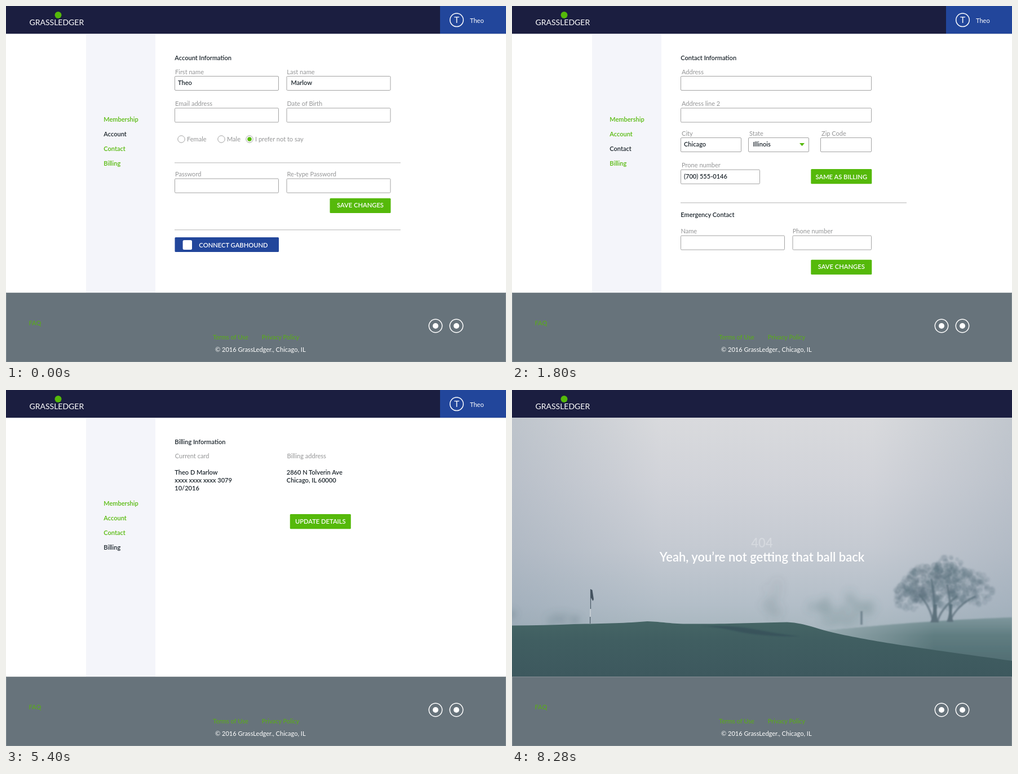
An HTML page for the animation above (9000 ms loop, 887x631 px).

```html
<!DOCTYPE html>
<html lang="en">
<head>
<meta charset="utf-8">
<title>Account pages</title>
<style>
  html, body { margin: 0; width: 100%; height: 100%; overflow: hidden; background: #fff; }
  svg { display: block; width: 100vw; height: 100vh; }
  text { font: 400 11.05px Lato, "Open Sans", sans-serif; fill: #949596; white-space: pre; }
  .bold { font-weight: 600; fill: #1c252c; }
  .link { font-weight: 600; fill: #55b90a; }
  .button { font-weight: 600; font-size: 11.2px; fill: #fff; text-anchor: middle; }
  .foot { fill: #59b013; }
  .white { fill: #fff; }
  .box { fill: #fff; stroke: #a3a3a3; }
  .rule { stroke: #b4b4b4; }
  .ring { fill: none; stroke: #fff; stroke-width: 1.5; }
  .headline { font-size: 22px; font-weight: 600; fill: #fff; text-anchor: middle; }
</style>
</head>
<body>
<svg id="stage" viewBox="0 0 887 631" preserveAspectRatio="none" xmlns="http://www.w3.org/2000/svg"></svg>
<script>
const PAGE_MS = 1800;
const GREEN = '#55b90a', NAVY = '#1b1e40', BLUE = '#22469b';
const PHONE = '(700) 555-0146';

// Text is placed by its left edge and the middle of its capitals.
const text = (x, y, str, cls = '') => `<text x="${x}" y="${y + 4}" class="${cls}">${str}</text>`;
const bold = (x, y, str) => text(x, y, str, 'bold');
const rect = (x, y, w, h, fill, rx = 0) =>
  `<rect x="${x}" y="${y}" width="${w}" height="${h}" rx="${rx}" fill="${fill}"/>`;
const circle = (x, y, r, attrs) => `<circle cx="${x}" cy="${y}" r="${r}" ${attrs}/>`;
const rule = y => `<path class="rule" d="M299 ${y}H700"/>`;
const caret = (x, y) => `<path d="M${x - 4.5} ${y - 2.5}h9l-4.5 5.2z" fill="${GREEN}"/>`;

const box = (x, y, w) =>
  `<rect class="box" x="${x + .5}" y="${y + .5}" width="${w - 1}" height="25" rx="1.5"/>`;
const field = (x, y, w, label, value = '', labelX = x + 1, valueX = x + 6) =>
  text(labelX, y - 7.5, label) + box(x, y, w) + (value && bold(valueX, y + 12, value));
const button = (x, y, label, textY = y + 12.5) =>
  rect(x, y, 108, 26.3, GREEN, 1.5) + text(x + 54, textY, label, 'button');
const radio = (x, label, on) =>
  circle(x, 236, 6.2, 'fill="#fff" stroke="#a3a3a3"') +
  (on ? circle(x, 236, 3.8, `fill="${GREEN}"`) : '') + text(x + 10, 236.3, label);

const addressRow = y =>
  field(299, y, 108, 'City', 'Chicago', 301) +
  field(419, y, 108, 'State', 'Illinois', 421, 427.5) + caret(514.5, y + 12.6) +
  field(547, y, 91, 'Zip Code', '', 549) +
  field(299, y + 56.7, 141, 'Prone number', PHONE, 301);

const nav = active => rect(142, 50, 123, 459, '#f4f5fa') +
  ['Membership', 'Account', 'Contact', 'Billing'].map((name, i) =>
    text(173.3, 200.5 + 26 * i, name, name === active ? 'bold' : 'link')).join('');

const user = rect(770, 0, 117, 49, BLUE) + circle(799.5, 24.8, 11.8, 'class="ring"') +
  '<text x="799.5" y="30.2" class="white" style="font-size:15.5px" text-anchor="middle">T</text>' +
  text(823, 25.5, 'Theo', 'white');

const header = rect(0, 0, 887, 49.2, NAVY) + circle(92.5, 16, 6, `fill="${GREEN}"`) +
  '<text x="41.5" y="34" class="white" style="font-size:14px">GRASSLEDGER</text>';

const badge = x => circle(x, 567, 11.7, 'class="ring"') + circle(x, 567, 5, 'fill="#fff"');
const footer = '<rect x=".5" y="508.5" width="886" height="122.5" fill="#67737b" stroke="#858e94"/>' +
  text(40.5, 562.3, 'FAQ', 'foot') + text(367, 587, 'Terms of Use', 'foot') +
  text(453.7, 587, 'Privacy Policy', 'foot') +
  text(371, 608.5, '© 2016 GrassLedger., Chicago, IL', 'white') + badge(762) + badge(799);

const account = nav('Account') + user + bold(299.3, 92, 'Account Information') +
  field(299, 124, 185, 'First name', 'Theo') +
  field(497.5, 124, 185, 'Last name', 'Marlow', 498.3, 505.5) +
  field(299, 180.5, 185, 'Email address') + field(497.5, 180.5, 185, 'Date of Birth') +
  radio(311, 'Female') + radio(382, 'Male') + radio(432, 'I prefer not to say', true) +
  rule(277.9) +
  field(299, 305.6, 185, 'Password') + field(497.5, 305.6, 185, 'Re-type Password') +
  button(574.5, 340.8, 'SAVE CHANGES') + rule(396.8) +
  rect(299.5, 410, 184.5, 26, BLUE, 1.5) + rect(313.6, 415, 16.4, 17, '#fff', 2.5) +
  text(403.5, 423.5, 'CONNECT GABHOUND', 'button');

const contact = nav('Contact') + user + bold(299.3, 92, 'Contact Information') +
  field(299, 124, 339, 'Address', '', 301) + field(299, 180.5, 339, 'Address line 2', '', 301) +
  addressRow(233) + button(530.3, 289, 'SAME AS BILLING', 302.5) + rule(348.8) +
  bold(299.3, 370, 'Emergency Contact') +
  field(299, 406.6, 185, 'Name', '', 299.5) +
  field(497.5, 406.6, 140.5, 'Phone number', '', 497.7) +
  button(530.3, 449.8, 'SAVE CHANGES');

const billing = nav('Billing') + user + bold(299.3, 91.5, 'Billing Information') +
  field(299, 124, 339, 'Name on card', 'Theo', 300.5, 308) +
  field(299, 180.5, 200, 'Card number', '', 299.5) + field(517, 180.5, 62, 'CVC', '', 517.5) +
  field(299, 237.3, 64.5, 'Expiration date', '', 299.5) + box(374, 237.3, 64.5) +
  text(305, 249.8, 'Month') + caret(350.5, 250.5) +
  text(386, 249.8, 'Year') + caret(425.5, 250.5) +
  field(299, 294, 339, 'Address', '', 301) + field(299, 350.6, 339, 'Address line 2', '', 301) +
  addressRow(403) + button(530.3, 459, 'SAVE CHANGES');

const summary = nav('Billing') + user + bold(299.3, 91.5, 'Billing Information') +
  text(299.7, 116.8, 'Current card') + text(498.5, 116.8, 'Billing address') +
  ['Theo D Marlow', 'xxxx xxxx xxxx 3079', '10/2016'].map((s, i) => bold(299.3, 146.3 + 13.6 * i, s)).join('') +
  ['2860 N Tolverin Ave', 'Chicago, IL 60000'].map((s, i) => bold(497.8, 146.3 + 13.6 * i, s)).join('') +
  button(503.8, 220, 'UPDATE DETAILS');

let seed = 11;
const random = () => (seed = seed * 16807 % 2147483647) / 2147483647;

// A cloud of leaf clumps inside an ellipse.
const foliage = (x, y, rx, ry, count, size, opacity) => Array.from({ length: count }, () => {
  const angle = random() * 2 * Math.PI, d = Math.sqrt(random());
  return circle((x + rx * d * Math.cos(angle)).toFixed(1), (y + ry * d * Math.sin(angle)).toFixed(1),
    (size * (.5 + random())).toFixed(1), `fill="#5b707d" opacity="${opacity}"`);
}).join('');

const gradient = (id, attrs, stops) => `<linearGradient id="${id}" ${attrs}>` +
  stops.map(([at, color, alpha = 1]) =>
    `<stop offset="${at}" stop-color="${color}" stop-opacity="${alpha}"/>`).join('') + '</linearGradient>';
const blur = (id, amount) =>
  `<filter id="${id}" x="-20%" y="-20%" width="140%" height="140%"><feGaussianBlur stdDeviation="${amount}"/></filter>`;
const DOWN = 'x1="0" y1="0" x2="0" y2="1"';

const defs = '<defs>' +
  gradient('sky', DOWN, [[0, '#d9dadd'], [.25, '#d1d3d9'], [.5, '#c5cad2'], [.72, '#b3bec8'], [.84, '#a6b5bd'], [1, '#9cadb4']]) +
  gradient('sides', '', [[0, '#8495a6', .32], [.3, '#8495a6', 0], [.72, '#8495a6', 0], [1, '#8495a6', .28]]) +
  gradient('field', DOWN, [[0, '#7f979d'], [.3, '#607d81'], [1, '#48656b']]) +
  gradient('haze', '', [[0, '#a4b4ba', .85], [.6, '#a4b4ba', 0]]) +
  gradient('hill', DOWN, [[0, '#456565'], [.35, '#405e61'], [1, '#3d585e']]) +
  blur('soft', 1.2) + blur('fog', 6) +
  '<clipPath id="photo"><rect y="49" width="887" height="460"/></clipPath></defs>';

const farField = 'M540 428C630 420 720 409 887 403V510H540Z';
const photo = '<g clip-path="url(#photo)">' +
  rect(0, 49, 887, 460, 'url(#sky)') + rect(0, 49, 887, 460, 'url(#sides)') +
  '<g filter="url(#fog)">' + foliage(582, 388, 58, 28, 50, 9, .06) +
  foliage(463, 375, 14, 38, 16, 9, .035) + foliage(85, 407, 35, 10, 20, 6, .09) +
  foliage(0, 395, 6, 12, 8, 5, .12) + '</g>' +
  `<g filter="url(#soft)"><path d="${farField}" fill="url(#field)"/><path d="${farField}" fill="url(#haze)"/>` +
  '<path d="M747 412Q743 385 722 362M748 411Q752 380 744 335M755 412Q758 390 790 365M777 411Q780 385 772 345' +
  'M776 411Q790 380 822 366M620 416V392" fill="none" stroke="#647782" stroke-width="3.5" opacity=".8"/>' +
  '<path d="M742 412Q748 400 747 380H754Q752 402 757 412ZM771 411Q777 398 775 380H781Q779 400 783 411Z" fill="#5d717c"/>' +
  foliage(763, 347, 72, 38, 230, 5.5, .17) + foliage(740, 342, 42, 34, 90, 5, .16) +
  foliage(778, 322, 28, 28, 70, 4.5, .17) + foliage(818, 352, 36, 30, 70, 4.5, .15) +
  foliage(706, 365, 32, 25, 70, 4.5, .15) + '</g>' +
  '<path d="M0 417.5Q60 417 110 415C165 414 205 413 240 410C270 411 275 414 310 414.5C370 415 420 413 488 411.5' +
  'C520 413 535 422 570 430C640 446 720 457 887 480V510H0Z" fill="url(#hill)"/>' +
  '<path d="M335 419Q390 416 430 424T510 437Q440 437 400 428T335 419Z" fill="#344e58" opacity=".65" filter="url(#soft)"/>' +
  '<path d="M139.5 353V388M138.6 402V414" stroke="#4a5966" stroke-width="1.2"/>' +
  '<path d="M139 388V402" stroke="#d6dade" stroke-width="1.2"/>' +
  '<path d="M139 353L142.5 354.5L145 371L143.5 374L140 368Z" fill="#44525f"/></g>';

const lost = photo +
  '<text x="443.5" y="278.5" class="headline" opacity=".27">404</text>' +
  '<text x="443.5" y="304" class="headline">Yeah, you’re not getting that ball back</text>';

const pages = [account, contact, billing, summary, lost];
const stage = document.getElementById('stage');
stage.innerHTML = defs + rect(0, 0, 887, 631, '#fff') + header +
  pages.map(page => `<g class="page">${page}</g>`).join('') + `<g id="footer">${footer}</g>`;
const layers = [...stage.querySelectorAll('.page')];
const footerLayer = document.getElementById('footer');

function draw() {
  const current = Math.floor(performance.now() / PAGE_MS) % pages.length;
  layers.forEach((layer, i) => layer.setAttribute('display', i === current ? 'inline' : 'none'));
  // The long billing form pushes the footer down slightly.
  footerLayer.setAttribute('transform', `translate(0 ${pages[current] === billing ? .6 : 0})`);
  requestAnimationFrame(draw);
}
draw();
</script>
</body>
</html>
```
